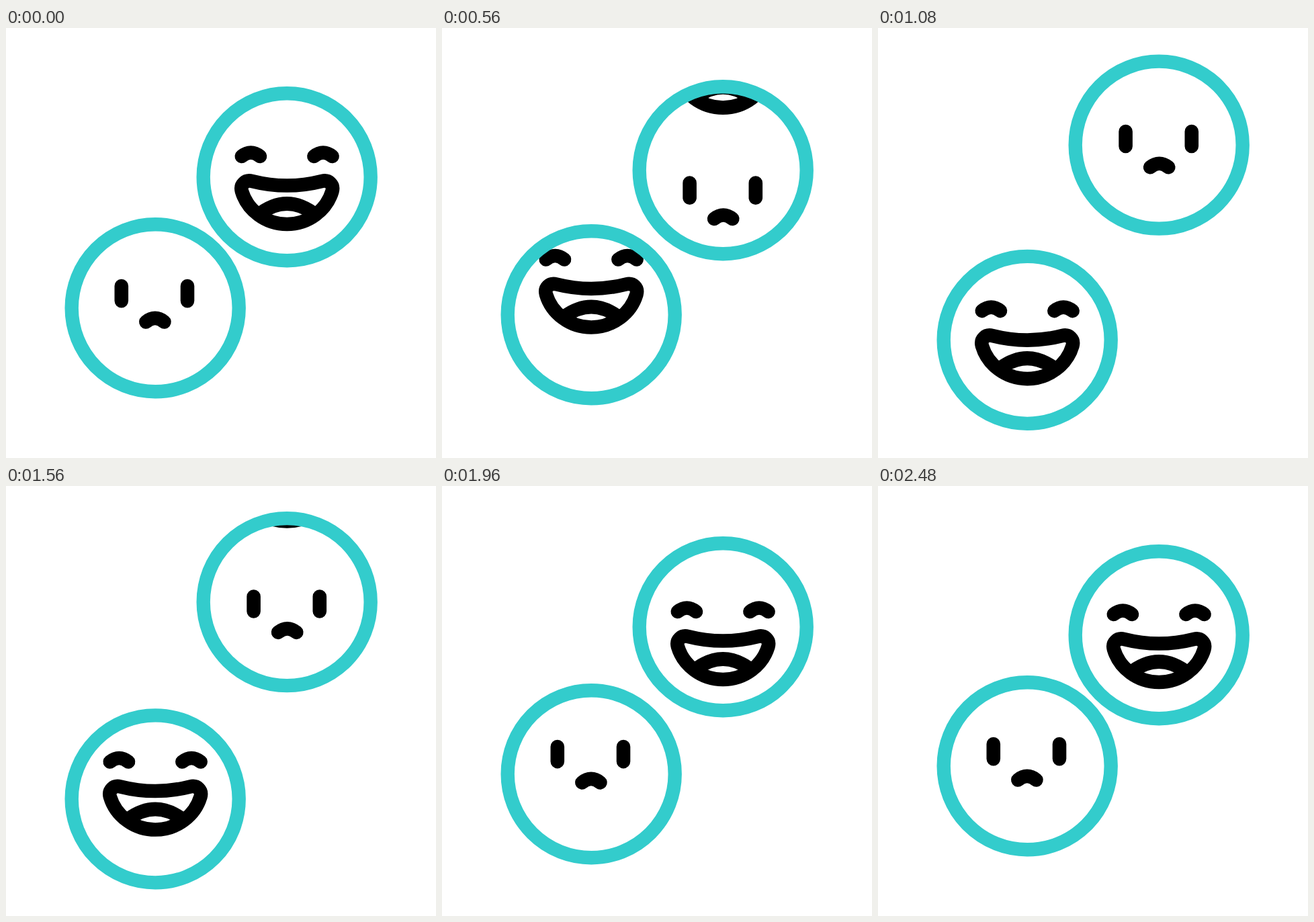
Animation of 640x640 px, one loop 2600 ms. Source, as an HTML page:

```html
<!DOCTYPE html>
<html lang="en">
<head>
<meta charset="utf-8">
<title>Mood swap</title>
<style>
  html, body { margin: 0; width: 100%; height: 100%; overflow: hidden; background: #fff; }
  svg { display: block; width: 100%; height: 100%; }
  .ring { fill: none; stroke: #33cccc; stroke-width: 20.4; }
  .ink { fill: none; stroke: #000; stroke-width: 20.6; stroke-linecap: round; stroke-linejoin: round; }
</style>
</head>
<body>
<svg viewBox="0 0 640 640">
  <defs>
    <clipPath id="inside"><circle r="120"/></clipPath>
    <path id="brow" d="M-13.6 5.5Q0 -5.5 13.6 5.5"/>
    <g id="laugh" class="ink">
      <use href="#brow" x="-53.8" y="-36.2"/>
      <use href="#brow" x="53.8" y="-36.2"/>
      <path d="M-52 6.2Q0 19.4 52 6.2C62 3.7 70 11.3 67.3 21.3C59 49.3 32 70.3 0 70.3S-59 49.3 -67.3 21.3C-70 11.3 -62 3.7 -52 6.2Z"/>
      <path d="M-40 54.3Q0 25.3 40 54.3"/>
    </g>
    <g id="sad" class="ink">
      <path d="M-50.4 -32.7V-10.7M47.8 -32.7V-10.7"/>
      <use href="#brow" x="-0.3" y="15.1"/>
    </g>
  </defs>
  <g id="stage"></g>
</svg>
<script>
const LOOP = 2600, STEP = 40;
const GAP = 215;      // distance between the two faces on a strip
const ROLL = 250;     // travel of the strip
const SPREAD = 51;    // travel of each ring

const balls = [
  { x: 418.2, y: 221.7, dir: -1, faces: ['laugh', 'sad'], shift: 0.8 },
  { x: 222.2, y: 416.8, dir: 1, faces: ['sad', 'laugh'], shift: 0 }
];

const clamp = p => Math.min(1, Math.max(0, p));
const cubic = p => p < 0.5 ? 4 * p ** 3 : 1 - 4 * (1 - p) ** 3;

// Bezier easing with flat ends; only the x handles vary.
const bezier = (x1, x2) => p => {
  let lo = 0, hi = 1, u;
  for (let i = 0; i < 24; i++) {
    u = (lo + hi) / 2;
    const x = 3 * u * (1 - u) ** 2 * x1 + 3 * u * u * (1 - u) * x2 + u ** 3;
    if (x < p) lo = u; else hi = u;
  }
  return u * u * (3 - 2 * u);
};

const part = (t, from, to, ease) => {
  const p = clamp((t - from) / (to - from));
  return p === 0 || p === 1 ? p : ease(p);
};
const outEase = bezier(0.5, 0.43), backEase = bezier(0.65, 0.25);
const spread = t => SPREAD * (part(t, 200, 1340, outEase) - part(t, 1360, 2420, backEase));
const roll = t => ROLL * (part(t, 216, 814, cubic) - part(t, 1419, 2062, cubic));

const move = (el, x, y) => el.setAttribute('transform', `translate(${x} ${y.toFixed(3)})`);

const stage = document.getElementById('stage');
stage.innerHTML = balls.map(b => `<g>
  <g clip-path="url(#inside)">${b.faces.map(f => `<use href="#${f}"/>`).join('')}</g>
  <circle class="ring" r="124.5"/></g>`).join('');
balls.forEach((b, i) => {
  b.el = stage.children[i];
  [b.home, b.guest] = b.el.firstElementChild.children;
});

function draw(t) {
  const d = spread(t), f = roll(t);
  for (const b of balls) {
    move(b.el, b.x, b.y + b.dir * d);
    move(b.home, 0, b.dir * (f - d));
    move(b.guest, b.shift, b.dir * (f - GAP - d));
  }
}

const start = performance.now();
function tick(now) {
  const t = Math.max(0, now - start) % LOOP;
  draw(Math.floor(t / STEP) * STEP);
  requestAnimationFrame(tick);
}
draw(0);
requestAnimationFrame(tick);
</script>
</body>
</html>
```
